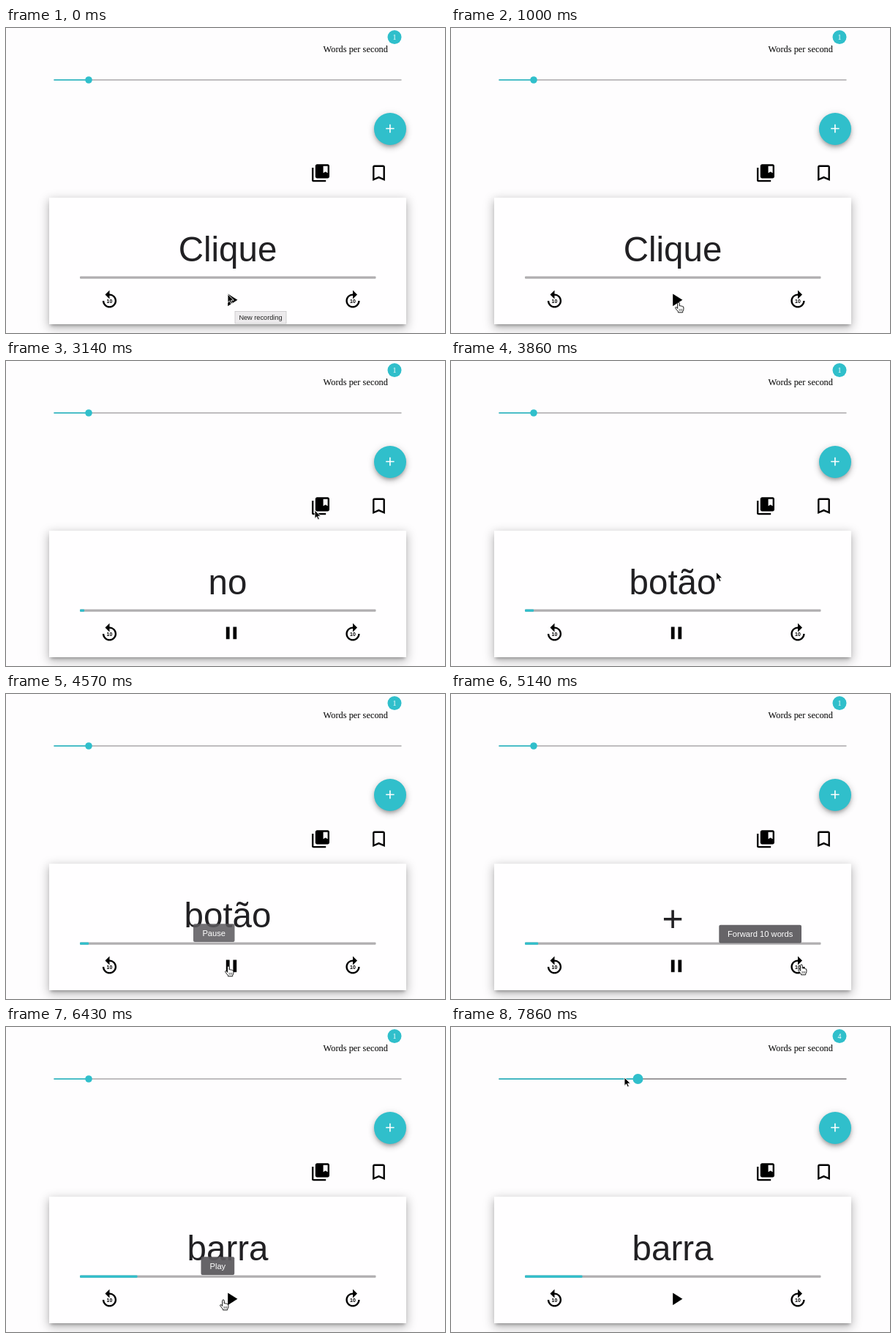
Animation of 600 by 417 pixels, one loop 8000 ms. Source, as an HTML page:

```html
<!DOCTYPE html>
<html lang="en">
<head>
<meta charset="utf-8">
<title>Word reader</title>
<style>
  html, body { margin: 0; width: 100%; height: 100%; overflow: hidden; background: #fefdfe; }
  div { position: absolute; }
  #card { left: 59px; top: 231.5px; width: 488px; height: 173px; background: #fffeff;
    box-shadow: 0 4px 4px -2px rgba(0,0,0,.25), 0 4px 13px 1px rgba(0,0,0,.28); }
  #fab { left: 503px; top: 115.5px; width: 44px; height: 44px; border-radius: 50%; background: #30bfcb;
    box-shadow: 0 3px 4px -1px rgba(0,0,0,.2), 0 4px 8px rgba(0,0,0,.18), 0 1px 12px rgba(0,0,0,.1); }
  svg { position: absolute; left: 0; top: 0; }
  text { font-family: "Liberation Sans", Arial, sans-serif; text-anchor: middle; }
  .serif { font-family: "Liberation Serif", "Times New Roman", serif; }
  .teal { fill: #30bfcb; }
  .ten { font-size: 7px; font-weight: bold; }
  .tip rect { fill: #5b595d; fill-opacity: .93; }
  .tip text { font-size: 11.2px; fill: #fff; }
</style>
</head>
<body>
<div id="card"></div>
<div id="fab"></div>
<svg width="600" height="417" viewBox="0 0 600 417">
  <text class="serif" x="522" y="33" font-size="12.4" style="text-anchor:end">Words per second</text>
  <circle class="teal" cx="531" cy="12.5" r="9.5"/>
  <text class="serif" id="badge" x="531" y="16" font-size="10" fill="#fff">1</text>

  <rect id="rail" x="65.5" y="70.2" width="475" height="1.6"/>
  <rect class="teal" id="filled" x="65.5" y="70.2" height="1.6"/>
  <circle class="teal" id="thumb" cy="71"/>

  <path d="M519.2 137.5h11.4M524.9 131.8v11.4" stroke="#fff" stroke-width="1.6"/>

  <g transform="translate(415.6 183.9) scale(1.2)">
    <path d="M4 6H2v14c0 1.1.9 2 2 2h14v-2H4zM20 2H8c-1.1 0-2 .9-2 2v12c0 1.1.9 2 2 2h12c1.1 0 2-.9 2-2V4c0-1.1-.9-2-2-2zm0 10l-2.5-1.5L15 12V4h5z"/>
  </g>
  <g transform="translate(495.1 183.9) scale(1.2)">
    <path d="M17 3H7c-1.1 0-2 .9-2 2v16l7-3 7 3V5c0-1.1-.9-2-2-2zm0 15l-5-2.2L7 18V5h10z"/>
  </g>

  <text id="word" x="303" fill="#212023"></text>
  <rect x="101" y="339.5" width="404.5" height="3.2" rx="1" fill="#b0aeb0"/>
  <rect class="teal" id="progress" x="101" y="339.5" height="3.2" rx="1"/>

  <path id="replay" transform="translate(127.1 357.4) scale(1.2)" d="M12 5V1L7 6l5 5V7c3.3 0 6 2.7 6 6s-2.7 6-6 6-6-2.7-6-6H4c0 4.4 3.6 8 8 8s8-3.6 8-8-3.6-8-8-8z"/>
  <use href="#replay" transform="translate(615.5 0) scale(-1 1)"/>
  <text class="ten" x="141.5" y="376.3">10</text>
  <text class="ten" x="474" y="376.3">10</text>

  <circle id="ripple" cx="302.5" cy="367" fill="#ecebec"/>
  <path id="toggle" transform="translate(293.6 357.4) scale(1.2)"/>

  <g id="hint">
    <rect x="313" y="387.5" width="70" height="16.5" fill="#eceaec" stroke="#c9c7c9" stroke-width=".8"/>
    <text x="348" y="398.8" font-size="9.2" fill="#222">New recording</text>
  </g>
  <g id="tips"></g>

  <g id="arrow">
    <path d="M0 0V11.4l2.6-2.5 1.8 4.2 2-.9-1.8-4h3.7z" stroke="#fff" stroke-width=".9"/>
  </g>
  <g id="hand" stroke="#111" stroke-width="1" stroke-linejoin="round">
    <path fill="#fff" d="M-1.3 8.5V1.3a1.3 1.3 0 0 1 2.6 0V5q1-.6 2 .2 1.1-.5 1.9.5 1.7-.2 1.7 1.4V9.5q0 1.6-1.2 3v1.4H-.6v-1.2Q-2.2 10.900-4 8.400q-.9-1.500.3-1.800 1.200-.2 2.400 1.900z"/>
    <path d="M1 9v3M2.800 9v3M4.600 9v3" stroke-width=".6"/>
  </g>
</svg>
<script>
const $ = id => document.getElementById(id);
const set = (id, attrs) => { for (const k in attrs) $(id).setAttribute(k, attrs[k]); };
const clamp = (v, a, b) => Math.min(b, Math.max(a, v));

const LOOP = 8000, FPS = 7;
const PLAY = "M8 5v14l11-7z", PAUSE = "M6 19h4V5H6zM14 5v14h4V5z";
const WORDS = { 0: "Clique", 1: "no", 2: "botão", 3: "+", 13: "barra" };

// time, x, y of the pointer's hot spot
const PATH = [
  [140, 303, 364], [860, 311, 375], [1140, 311, 375], [1290, 311, 374.5], [1570, 311, 374],
  [2290, 311, 374], [3000, 422, 204], [3430, 422, 204], [4280, 304, 372], [4570, 304, 372],
  [5000, 479, 370], [5570, 479, 370], [6140, 297, 373], [6570, 297, 373],
  [7140, 113, 70], [7290, 113, 70], [7860, 237, 69]
];

// label, left, top, width, shown from, shown until
const TIPS = [
  ["Pause", 256, 314.3, 56.500, 1850, 2420],
  ["Pause", 256, 314.3, 56.500, 4280, 4700],
  ["Forward 10 words", 366.300, 315.700, 112.700, 4990, 5700],
  ["Play", 266.500, 314.300, 45.700, 6280, 6840]
];

$("tips").innerHTML = TIPS.map(([label, x, y, w]) =>
  `<g class="tip"><rect x="${x}" y="${y}" width="${w}" height="24.800" rx="2"/>` +
  `<text x="${x + w / 2}" y="${y + 16.200}">${label}</text></g>`).join("");

function pointer(t) {
  const i = PATH.findIndex(p => p[0] > t);
  if (i < 0) return PATH[PATH.length - 1].slice(1);
  if (!i) return PATH[0].slice(1);
  const [t0, x0, y0] = PATH[i - 1], [t1, x1, y1] = PATH[i];
  const u = (t - t0) / (t1 - t0), e = u * u * (3 - 2 * u);
  return [x0 + (x1 - x0) * e, y0 + (y1 - y0) * e];
}

function draw(t) {
  const [x, y] = pointer(t);
  const overButton = t > 300 && y > 357 && (Math.abs(x - 306) < 17 || Math.abs(x - 474) < 17);
  set("arrow", { transform: `translate(${x} ${y})`, visibility: overButton ? "hidden" : "visible" });
  set("hand", { transform: `translate(${x} ${y})`, visibility: overButton ? "visible" : "hidden" });

  const dragging = t > 7130;
  const speed = dragging ? clamp(Math.round((x - 65.5) / 47.5), 1, 10) : 1;
  $("badge").textContent = speed;
  set("rail", { fill: dragging ? "#858385" : "#b0aeb0" });
  set("filled", { width: speed * 47.5 });
  set("thumb", { cx: 65.5 + speed * 47.5, r: dragging ? 7 : 4.8 });

  const index = t > 5420 ? 13 : clamp(Math.floor((t - 1850) / 1000), 0, 3);
  const plus = index === 3;
  $("word").textContent = WORDS[index];
  set("word", { y: plus ? 324 : 319, "font-size": plus ? 50 : 47.5 });
  set("progress", { width: index * 6.04 });

  set("toggle", { d: t > 1850 && t < 6270 ? PAUSE : PLAY });
  set("ripple", { r: t > 1850 && t < 2280 ? (t < 1990 ? 8 : 13) : 0 });
  set("hint", { visibility: t < 130 ? "visible" : "hidden" });
  TIPS.forEach(([, , , , from, to], i) => {
    const fade = clamp(Math.min((t - from) / 140, (to - t) / 140), 0, 1);
    $("tips").children[i].setAttribute("opacity", fade);
  });
}

function frame() {
  const step = Math.floor((performance.now() % LOOP + 5) * FPS / 1000);
  draw(step * 1000 / FPS % LOOP);
  requestAnimationFrame(frame);
}
frame();
</script>
</body>
</html>
```
